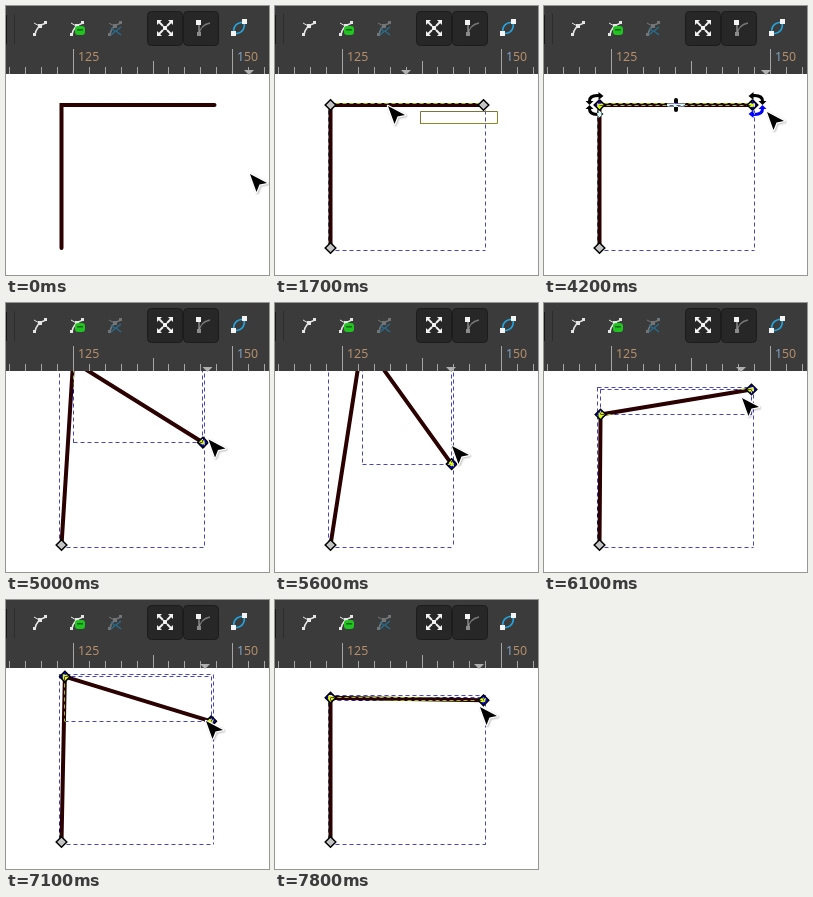
Write an HTML page with a canvas that moves like this. It is 263 px wide and 269 px high and loops after 8000 ms.

```html
<!DOCTYPE html>
<html lang="en">
<head>
<meta charset="utf-8">
<title>Rotating two nodes of a path</title>
<style>
html, body { margin: 0; width: 100%; height: 100%; overflow: hidden; background: #fff; }
canvas { display: block; width: 263px; height: 269px; }
</style>
</head>
<body>
<canvas id="stage" width="263" height="269"></canvas>
<script>
const g = document.getElementById('stage').getContext('2d');
const LOOP = 8000, STEP = 100, TOP = 68;
const MID = { x: 132, y: 99 }, HALF = 76.5, FOOT = { x: 55.5, y: 242 };
const INK = '#2b0000';

// [ms, x, y] of the pointer tip
const POINTER = [
  [200, 244, 168], [600, 224, 132], [900, 205, 101], [1000, 205, 101],
  [1200, 223, 118], [1400, 180, 109], [1500, 145, 105], [1600, 132, 102],
  [1700, 113, 100], [1900, 42, 91], [2000, 27, 90], [2200, 30, 91],
  [2800, 213, 105], [3100, 219, 107], [3800, 219, 107], [4200, 223, 106],
  [4600, 223, 106], [4900, 213, 128], [5100, 192, 145], [5300, 168, 154],
  [5500, 168, 154], [5600, 177, 143], [5800, 191, 122], [6100, 198, 95],
  [6300, 195, 80], [6400, 195, 80], [6800, 200, 99], [7100, 200, 121],
  [7200, 200, 121], [7800, 205, 107]
];
// [ms, degrees] of the selected segment
const TURN = [
  [4600, 0], [4900, 18], [5100, 46], [5300, 66], [5500, 66], [5600, 54.3],
  [6100, -9.4], [6300, -20], [6400, -20], [6800, -2], [7100, 17], [7200, 17], [7800, 1]
];

function track(keys, t) {
  if (t <= keys[0][0]) return keys[0].slice(1);
  for (let i = 1; i < keys.length; i++) {
    const a = keys[i - 1], b = keys[i];
    if (t <= b[0]) {
      const k = (t - a[0]) / (b[0] - a[0]);
      return a.slice(1).map((v, n) => v + (b[n + 1] - v) * k);
    }
  }
  return keys[keys.length - 1].slice(1);
}

function rect(x, y, w, h, fill) {
  g.fillStyle = fill;
  g.fillRect(x, y, w, h);
}

function line(points, color, width) {
  g.beginPath();
  points.forEach(p => g.lineTo(p[0], p[1]));
  g.strokeStyle = color;
  g.lineWidth = width;
  g.stroke();
}

function poly(points, color) {
  g.beginPath();
  points.forEach(p => g.lineTo(p[0], p[1]));
  g.closePath();
  g.fillStyle = color;
  g.fill();
}

function curve(x0, y0, cx, cy, x1, y1, color, width) {
  g.beginPath();
  g.moveTo(x0, y0);
  g.quadraticCurveTo(cx, cy, x1, y1);
  g.strokeStyle = color;
  g.lineWidth = width;
  g.stroke();
}

function inverted(draw) {
  g.save();
  g.globalCompositeOperation = 'difference';
  draw();
  g.restore();
}

function button(x) {
  g.beginPath();
  g.roundRect(x + .5, 5.5, 35, 34, 4);
  g.fillStyle = '#272727';
  g.fill();
  g.strokeStyle = '#1c1c1c';
  g.lineWidth = 1;
  g.stroke();
}

function nodeIcon(x, color) {
  curve(x - 5, 29, x - 4, 20, x + 6, 17, color, 1.5);
  line([[x - 6, 17], [x + 1, 21]], color, 1);
  rect(x - 7, 27, 3, 3, color);
  rect(x - 2, 18, 4, 4, color);
  rect(x + 4, 15, 3, 3, color);
}

function toolbar() {
  rect(0, 0, 263, TOP, '#3b3b3b');
  rect(0, 9, 1, 29, '#161616');
  rect(8, 8, 1, 30, '#2d2d2d');

  nodeIcon(34, '#e6e6e6');
  nodeIcon(71, '#e6e6e6');
  g.beginPath();
  g.roundRect(69, 20, 10, 9, 3);
  g.fillStyle = '#1fc41f';
  g.fill();
  rect(71, 23, 6, 1.5, '#17631b');
  nodeIcon(109, '#737678');
  line([[105, 22], [109, 25.5], [105, 29]], '#286b8b', 1.5);
  line([[115, 21], [110, 25], [115, 29]], '#286b8b', 1.5);

  button(141);
  button(177);
  for (const sx of [-1, 1]) for (const sy of [-1, 1]) {
    const at = (x, y) => [159 + sx * x, 22 + sy * y];
    line([at(2, 2), at(6, 6)], '#f2f2f2', 2);
    poly([at(8, 8), at(8, 3), at(3, 8)], '#f2f2f2');
  }
  rect(157, 20, 4, 4, '#f2f2f2');

  curve(193, 29, 194, 19, 204, 17, '#777', 1.3);
  line([[193, 17], [193, 27]], '#bbb', 1);
  rect(190, 14, 5, 5, '#f2f2f2');
  rect(191, 26, 4, 4, '#8a8a8a');

  curve(228, 28, 226, 17, 238, 16, '#24a5e0', 1.7);
  curve(228, 28, 240, 27, 238, 16, '#24a5e0', 1.7);
  rect(236, 13, 5, 5, '#f4f4f4');
  rect(225, 25, 5, 5, '#f4f4f4');
}

function ruler(x) {
  for (let i = -4; i <= 12; i++) {
    const top = i % 10 === 0 ? 43 : i === 5 ? 55 : 61;
    rect(Math.round(67 + i * 15.9), top, 1, TOP - top, '#a5a5a5');
  }
  g.font = '12.4px "Noto Sans", "Open Sans", sans-serif';
  g.fillStyle = '#b58f6b';
  g.fillText('125', 72, 55);
  g.fillText('50', 238, 55);
  g.fillStyle = '#7fa2c4';
  g.fillText('1', 231, 55);
  poly([[x - 5, 64], [x + 5, 64], [x, 69]], '#b0b0b0');
}

function box(points, pad) {
  const xs = points.map(p => p.x), ys = points.map(p => p.y);
  const l = Math.floor(Math.min(...xs) - pad) + .5, r = Math.floor(Math.max(...xs) + pad) + .5;
  const t = Math.floor(Math.min(...ys) - pad) + .5, b = Math.floor(Math.max(...ys) + pad) + .5;
  inverted(() => {
    g.setLineDash([4, 3]);
    // each side from its own start, so the dashes stay put on the far sides
    const c = '#bbbb33';
    line([[l, t], [r, t]], c, 1);
    if (b - t > 1) {
      line([[l, b], [r, b]], c, 1);
      line([[l, t], [l, b]], c, 1);
      line([[r, t], [r, b]], c, 1);
    }
  });
}

function node(p, selected) {
  const d = 5.3;
  const shape = [[p.x, p.y - d], [p.x + d, p.y], [p.x, p.y + d], [p.x - d, p.y]];
  if (selected) inverted(() => poly(shape, '#ffff00'));
  else poly(shape, '#c4c4c4');
  line([...shape, shape[0], shape[1]], '#000', 1.5);
}

function turnHandle(p, sx, sy, color) {
  inverted(() => {
    g.translate(p.x, p.y);
    g.scale(sx, sy);
    g.beginPath();
    g.moveTo(-4, 9);
    g.lineTo(1, 13);
    g.lineTo(1, 11);
    g.quadraticCurveTo(11.5, 11.5, 11.5, 4);
    g.lineTo(14, 4);
    g.lineTo(10, 0);
    g.lineTo(6, 4);
    g.lineTo(8.5, 4);
    g.quadraticCurveTo(8.5, 8, 1, 8);
    g.lineTo(1, 5);
    g.closePath();
    g.fillStyle = color;
    g.fill();
  });
}

function pivot() {
  inverted(() => {
    g.beginPath();
    g.roundRect(MID.x - 2, MID.y - 7, 4, 14, 2);
    g.roundRect(MID.x - 9, MID.y - 1.5, 18, 3, 1);
    g.fillStyle = '#fff';
    g.fill();
  });
}

function pointer(x, y) {
  const shape = [[0, 0], [17, 9], [9.5, 10.5], [6.5, 18]].map(p => [x + p[0], y + p[1]]);
  g.save();
  g.lineJoin = 'round';
  g.shadowColor = 'rgba(0,0,0,.25)';
  g.shadowBlur = 2;
  g.shadowOffsetX = g.shadowOffsetY = 1;
  line([...shape, shape[0], shape[1]], '#fff', 2.4);
  g.restore();
  poly(shape, '#000');
}

function rubberBand(t) {
  const [x, y] = track(POINTER, t - 200).map(v => Math.round(v) + .5);
  line([[x, 118], [x, y], [222.5, y]], '#77773c', 1);
  line([[x, 117.5], [222.5, 117.5], [222.5, y]], '#8a8a24', 1);
}

function draw(t) {
  const [px, py] = track(POINTER, t);
  const turn = track(TURN, t)[0] * Math.PI / 180;
  const dx = HALF * Math.cos(turn), dy = HALF * Math.sin(turn);
  const a = { x: MID.x - dx, y: MID.y - dy }, b = { x: MID.x + dx, y: MID.y + dy };
  const path = [FOOT, a, b].map(p => [p.x, p.y]);
  const editing = t >= 1100, selected = t >= 2200, dragging = t >= 1400 && t < 2200;

  rect(0, 0, 263, 269, '#fff');
  g.lineCap = 'round';
  line(path, INK, 4);
  g.lineCap = 'butt';
  if (t >= 800 && t < 1300) line(path, '#ff0000', 1);

  if (editing) {
    box([FOOT, a, b], 2);
    if (selected) box([a, b], 0);
    node(FOOT, false);
    node(a, selected);
    node(b, selected);
  }
  if (t >= 3600 && t < 4700) {
    turnHandle(a, -1, -1, '#fff');
    turnHandle(a, -1, 1, '#fff');
    turnHandle(b, 1, -1, '#fff');
    turnHandle(b, 1, 1, t >= 4000 ? '#ffff00' : '#fff');
    pivot();
  }
  if (dragging) rubberBand(t);

  toolbar();
  ruler(dragging ? track(POINTER, t - 100)[0] - 1 : px - 1);
  pointer(px, py);
}

const start = performance.now();
function tick() {
  const t = (performance.now() - start) % LOOP;
  draw(Math.floor(t / STEP) * STEP);
  requestAnimationFrame(tick);
}
tick();
</script>
</body>
</html>
```
